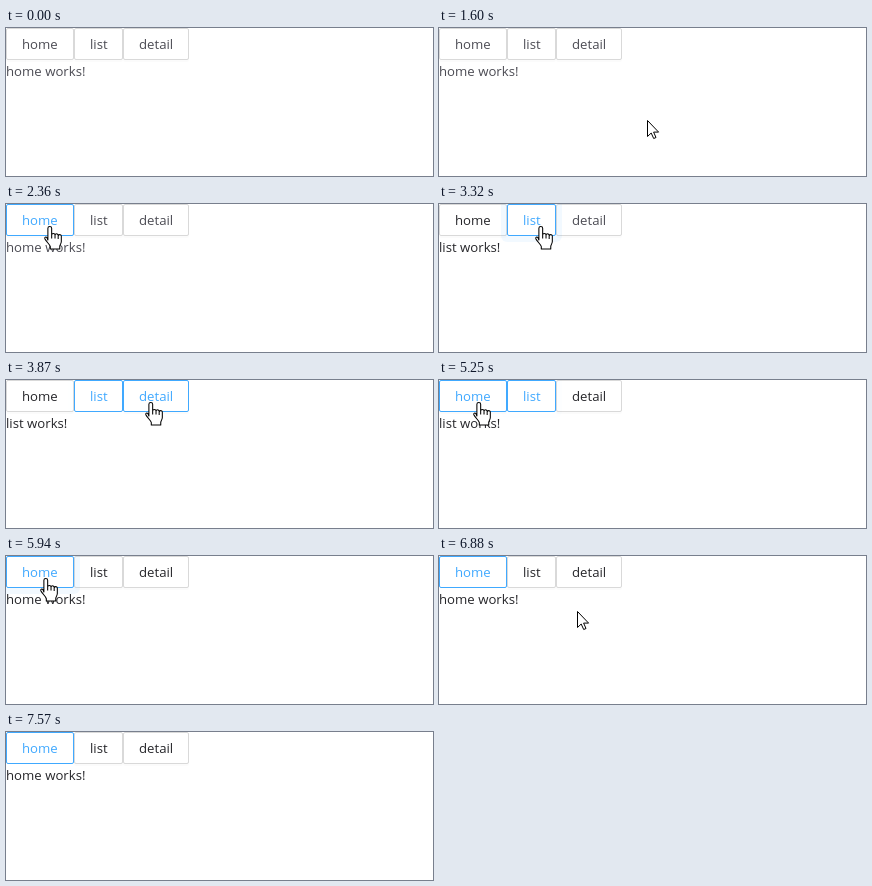
An HTML page for the animation above (7900 ms loop, 427x148 px).

```html
<!DOCTYPE html>
<html lang="en">
<head>
<meta charset="utf-8">
<style>
  html, body { margin: 0; width: 100%; height: 100%; overflow: hidden; background: #fff; }
  body { position: relative; font: 13.2px "Open Sans", "Noto Sans", sans-serif; }
  #bar { display: flex; height: 32px; }
  .btn {
    position: relative; height: 32px; box-sizing: border-box; flex: none;
    border: 1px solid; border-radius: 2px; padding-left: 15px; line-height: 30px; background: #fff;
  }
  #page { position: absolute; left: 0; top: 32px; line-height: 22px; white-space: nowrap; }
  svg { position: absolute; left: 0; top: 0; width: 18px; height: 25px; z-index: 5; overflow: visible; }
  path { fill: #fff; stroke: #000; stroke-linejoin: round; }
</style>
</head>
<body>
<div id="bar">
  <div class="btn" style="width:68px">home</div>
  <div class="btn" style="width:49px">list</div>
  <div class="btn" style="width:66px">detail</div>
</div>
<div id="page"></div>
<svg id="hand"><path transform="scale(1.05 1)" d="M3.7 14V2.3a1.8 1.8 0 0 1 3.6 0V9a1.6 1.6 0 0 1 3.2 0 1.5 1.5 0 0 1 3 .8 1.5 1.5 0 0 1 3 .8V15.5c0 2-1.5 3.5-1.5 5V23H6v-2.5C5.5 18.5 2 15.5 .8 12.8c-.6-1.5 1-2.3 2-1.2zM7.3 8.5v4M10.5 9v3.5M13.5 10v3"/></svg>
<svg id="arrow"><path d="M.5 .5v16l3.7-3.5 2.5 5.5 2.3-1-2.4-5.4h5z"/></svg>
<script>
const LOOP = 7900, FADE = 300, ENTER = 1520, LEAVE = 6600, GONE = 7540;
const names = ['home', 'list', 'detail'];
const [home, list, detail] = names.keys();
const buttons = [...document.querySelectorAll('.btn')];
const page = document.getElementById('page');
const hand = document.getElementById('hand');
const arrow = document.getElementById('arrow');
const edges = buttons.map(el => el.offsetLeft + el.offsetWidth);

// Each visit: pointer arrives at x, then clicks the button
const visits = [
  { arrive: 2360, click: 2480, x: 44, button: home },
  { arrive: 2950, click: 3030, x: 102, button: list },
  { arrive: 3720, click: 3920, x: 145, button: detail },
  { arrive: 4380, click: 4580, x: 85, button: list },
  { arrive: 5230, click: 5650, x: 40, button: home }
];
const ROW = 22, TRAVEL = 380;

const clamp = v => Math.min(1, Math.max(0, v));
const easeOut = (v, power) => 1 - (1 - clamp(v)) ** power;
const lerp = (a, b, k) => a + (b - a) * k;
const mix = (a, b, k) => `rgb(${a.map((v, i) => Math.round(lerp(v, b[i], k)))})`;

const BLUE = [64, 169, 255], LINE = [217, 217, 217];
const GRAY = [76, 76, 84], DARK = [38, 38, 42];

const clicked = t => visits.filter(v => v.click <= t);

function pointer(t) {
  if (t < ENTER || t > GONE) return null;
  if (t > LEAVE) {
    const k = (t - LEAVE) / (GONE - LEAVE);
    return [lerp(40, 370, k), lerp(ROW, 134, k)];
  }
  let x = 266, y = 116;
  visits.forEach((v, i) => {
    const travel = i ? TRAVEL : v.arrive - ENTER;
    const k = easeOut((t - v.arrive + travel) / travel, 3);
    x = lerp(x, v.x, k);
    y = lerp(y, ROW, k);
  });
  return [x, y];
}

function hovered(t) {
  const p = pointer(t);
  return p && p[1] < 32 ? edges.findIndex(edge => p[0] < edge) : -1;
}

const isActive = (i, t) => clicked(t).at(-1)?.button === i || hovered(t) === i;

// Share of the last FADE ms in which the button was active
function highlight(i, t) {
  const steps = 20;
  let sum = 0;
  for (let s = 0; s < steps; s++) sum += isActive(i, t - FADE * s / steps);
  return sum / steps;
}

function drawButton(el, i, t, done) {
  const k = highlight(i, t), last = done.at(-1);
  const base = done.some(v => v.button === i) ? DARK : GRAY;
  const wave = last?.button === i;
  const age = wave ? t - last.click : 0;
  const alpha = 0.2 * (1 - easeOut(age / 2000, 7));
  el.style.borderColor = mix(LINE, BLUE, k);
  el.style.color = mix(base, BLUE, k);
  el.style.boxShadow = wave
    ? `0 0 0 ${6 * easeOut(age / 400, 7)}px rgba(64,169,255,${alpha.toFixed(4)})`
    : '0 2px 0 rgba(0,0,0,.015)';
  el.style.zIndex = wave ? 2 : 0;
}

function drawPointer(t) {
  const p = pointer(t), over = hovered(t) >= 0;
  hand.style.display = p && over ? 'block' : 'none';
  arrow.style.display = p && !over ? 'block' : 'none';
  if (!p) return;
  const [x, y] = p.map(Math.round);
  (over ? hand : arrow).style.transform = `translate(${x - (over ? 6 : 0)}px,${y}px)`;
}

function draw(t) {
  const done = clicked(t);
  buttons.forEach((el, i) => drawButton(el, i, t, done));
  page.textContent = names[done.at(-1)?.button ?? home] + ' works!';
  page.style.color = mix(done.length ? DARK : GRAY, DARK, 0);
  drawPointer(t);
}

let start;
function tick(now) {
  start ??= now;
  draw((now - start) % LOOP);
  requestAnimationFrame(tick);
}
draw(0);
requestAnimationFrame(tick);
</script>
</body>
</html>
```
